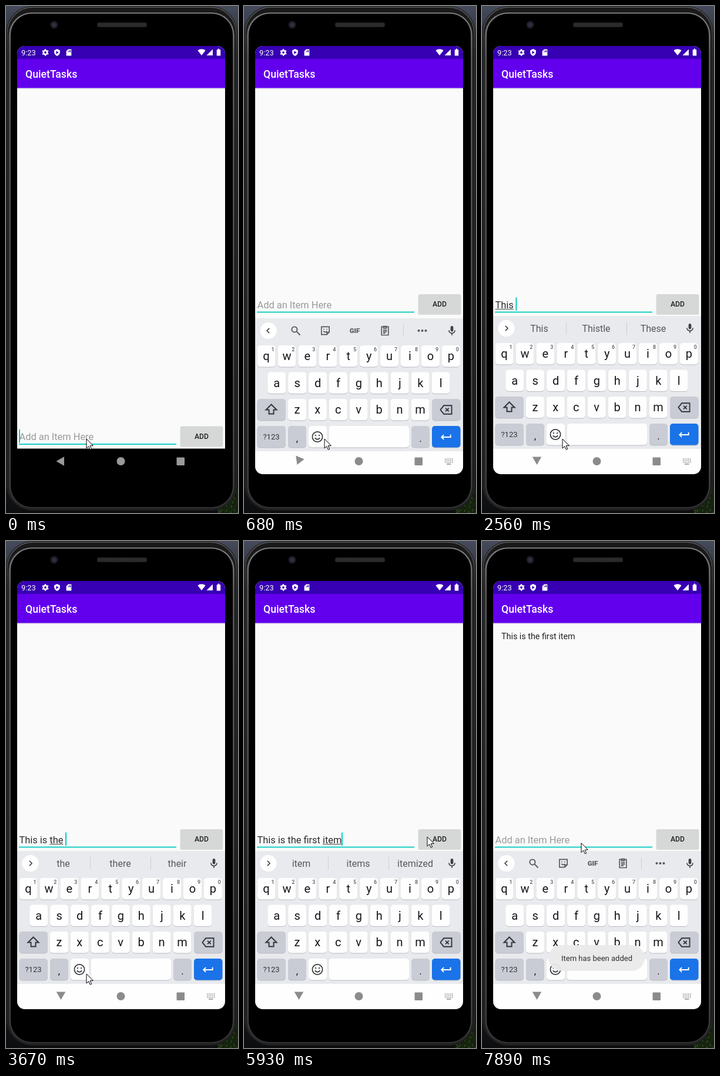
Recreate the animation shown at these times as an HTML page with a canvas. Size 395x862 px, loop 8000 ms.

```html
<!DOCTYPE html>
<html lang="en">
<head>
<meta charset="utf-8">
<title>To-do list demo</title>
<style>
  html, body { margin: 0; width: 100%; height: 100%; overflow: hidden; background: #15161a; }
  canvas { display: block; width: 395px; height: 862px; }
</style>
</head>
<body>
<canvas id="stage"></canvas>
<script>
const W = 395, H = 862, LOOP = 8000, STEP = 133;
const canvas = document.getElementById('stage');
const dpr = window.devicePixelRatio || 1;
canvas.width = W * dpr;
canvas.height = H * dpr;
const c = canvas.getContext('2d');

// [time, field text, suggestions]
const typing = [
  [0, '', ''],
  [1520, 'T', ''],
  [1760, 'Th', 'Th The This'],
  [1900, 'Thi', 'Thi This Think'],
  [2040, 'This', 'This Thistle These'],
  [2320, 'This ', 'This Thistle These'],
  [2580, 'This i', 'i is in'],
  [2710, 'This is', 'is isn\'t it'],
  [2840, 'This is ', 'is isn\'t it'],
  [3110, 'This is t', 't the to'],
  [3380, 'This is th', 'th the that'],
  [3530, 'This is the', 'the there their'],
  [3670, 'This is the ', 'the there their'],
  [3830, 'This is the f', 'f for from'],
  [3950, 'This is the fi', 'fi first find'],
  [4070, 'This is the firs', 'firs first firsts'],
  [4190, 'This is the first', 'first firstly firsthand'],
  [4310, 'This is the first ', 'first firstly firsthand'],
  [4430, 'This is the first i', 'i is in'],
  [4690, 'This is the first ite', 'ite item its'],
  [5000, 'This is the first item', 'item items itemized'],
  [6590, '', '']
];
const caretOff = [[620, 950], [5530, 5930], [6450, 6590], [7090, 7370], [7890, 8000]];

const icons = {
  shield: 'M12 1 3 5v6c0 6 4 10 9 12 5-2 9-6 9-12V5zM9 7l8 5-8 5z',
  card: 'M20 2H10L4 8v14h16zM9 7h2v4H9zM13 5h2v6h-2zM16 5h2v6h-2z',
  wifi: 'M12 22 0 7C7 1 17 1 24 7z',
  signal: 'M1 22h21V1z',
  battery: 'M6 4h4V1h4v3h4v19H6z',
  back: 'M14 7 9 12l5 5',
  next: 'M10 7l5 5-5 5',
  search: 'M15 9.5a5.5 5.5 0 1 1-11 0a5.5 5.5 0 1 1 11 0M14 14l7 7',
  sticker: 'M4 4h16v11l-5 5H4zM20 15h-5v5M8 9h2M14 9h2M8 13q4 4 7 0',
  clip: 'M5 4h14v17H5zM9 3h6v4H9zM8 11h8M8 14h8M8 17h5',
  mic: 'M9 5a3 3 0 0 1 6 0v6a3 3 0 0 1-6 0zM11 17h2v5h-2z',
  micArc: 'M5.5 11a6.5 6.5 0 0 0 13 0',
  shift: 'M12 3 3 12h5v7h8v-7h5z',
  erase: 'M8 4.5h14v15H8l-6-7.5zM11 9l6 6M17 9l-6 6',
  enter: 'M20 8v4.5H4M8 8.5l-4 4 4 4',
  smile: 'M21 12a9 9 0 1 1-18 0a9 9 0 1 1 18 0M7.5 9.5h2.5M14 9.5h2.5M7.5 14q4.5 5 9 0'
};
const paths = Object.fromEntries(Object.entries(icons).map(([k, d]) => [k, new Path2D(d)]));

const clamp = v => Math.min(1, Math.max(0, v));
const lerp = (a, b, p) => a + (b - a) * p;
const ease = p => p * p * (3 - 2 * p);
// Progress that advances in held steps, like the screen capture
const held = (t, from, to) => clamp(Math.floor((t - from) / STEP) * STEP / (to - from));

function rect(x, y, w, h, color, r = 0) {
  c.fillStyle = color;
  c.beginPath();
  c.roundRect(x, y, w, h, r);
  c.fill();
}

function ring(x, y, w, h, r, color, line) {
  c.strokeStyle = color;
  c.lineWidth = line;
  c.beginPath();
  c.roundRect(x, y, w, h, r);
  c.stroke();
}

function disc(x, y, r, color) {
  c.fillStyle = color;
  c.beginPath();
  c.arc(x, y, r, 0, 7);
  c.fill();
}

// Vertical gradient over the whole stage
function fade(...stops) {
  const g = c.createLinearGradient(0, 0, 0, H);
  for (const [at, color] of stops) g.addColorStop(at, color);
  return g;
}

// y is the middle of the capitals; baselines sit on whole pixels
function text(s, x, y, size, color, align = 'left', weight = 400) {
  c.font = `${weight} ${size}px Roboto, sans-serif`;
  c.textAlign = align;
  c.fillStyle = color;
  c.fillText(s, x, Math.round(y + size * 0.355));
}

function icon(name, x, y, size, color, line = 0) {
  c.save();
  c.translate(x, y);
  c.scale(size / 24, size / 24);
  c.translate(-12, -12);
  c.fillStyle = c.strokeStyle = color;
  c.lineWidth = line;
  if (line) c.stroke(paths[name]);
  else c.fill(paths[name], 'evenodd');
  c.restore();
}

function drawPhone() {
  rect(0, 0, W, H, fade([0, '#454b5c'], [0.1, '#25272c'], [0.9, '#1b1c20'], [1, '#0c0d0f']));
  rect(360, 820, 35, 42, '#16240f');
  for (let i = 0, seed = 7; i < 60; i++) {
    seed = seed * 16807 % 2147483647;
    rect(360 + seed % 35, 820 + (seed >> 8) % 42, 1.5, 4, i % 2 ? '#2f4c1b' : '#101a0c');
  }
  rect(0, 0, 394, 858, '#1a1a1b', 46);
  ring(2, 2, 390, 854, 44, fade([0, '#5a5a5c'], [0.1, '#303032'], [1, '#242425']), 1.5);
  rect(4.5, 11, 384.5, 843, fade([0, '#606062'], [0.1, '#454547'], [1, '#303031']), 39);
  rect(8, 13, 378, 839, '#000', 36);
  ring(7, 12, 380.5, 841, 37, fade([0, '#9a9a9c'], [0.1, '#626264'], [0.9, '#4a4a4c'], [1, '#333']), 1.2);
  rect(155, 28, 85, 8, '#262626', 3);
  for (let x = 158; x < 238; x += 3) rect(x, 30, 1.2, 4, '#353535');
  disc(82, 32, 6.5, '#1d1e24');
  disc(82, 32, 3.5, '#2b3044');
}

function drawBars() {
  rect(19, 68, 354, 22, '#3700b3');
  rect(19, 140, 354, 1, '#dcdcde');
  rect(19, 90, 354, 49.6, '#6200ee');
  text('9:23', 26, 79, 12.8, '#fff');
  c.strokeStyle = '#fff';
  c.lineWidth = 2.6;
  c.beginPath();
  c.arc(67, 79, 3.2, 0, 7);
  c.stroke();
  for (let i = 0; i < 6; i++) {
    const a = i * Math.PI / 3 + 0.5;
    disc(67 + 4.7 * Math.cos(a), 79 + 4.7 * Math.sin(a), 1.2, '#fff');
  }
  icon('shield', 87, 79, 13, '#fff');
  icon('card', 107, 79, 13, '#fff');
  icon('wifi', 333, 78.5, 13, '#fff');
  icon('signal', 347, 79, 12, '#fff');
  icon('battery', 362, 78.5, 13, '#fff');
  text('QuietTasks', 33, 116, 17.7, '#fff', 'left', 500);
}

function drawField(t, dy, value, hasSuggestions) {
  const left = 22.5;
  text(value || 'Add an Item Here', left, 508 + dy, 16.4, value ? '#2b2b2b' : '#9a9a9a');
  if (hasSuggestions) {
    const start = value.trimEnd().lastIndexOf(' ') + 1;
    const x = left + c.measureText(value.slice(0, start)).width;
    rect(x, 515 + dy, c.measureText(value.slice(start).trim()).width, 1, '#444');
  }
  if (!caretOff.some(([a, b]) => t >= a && t < b)) {
    rect(value ? left - 0.5 + c.measureText(value).width : 22, 495.5 + dy, 2, 22.5, '#03cfc3');
  }
  rect(22, 519.5 + dy, 268, 2, '#16d0c4');
  rect(296.5, 491 + dy, 73, 34, '#d9d9d9', 2);
  rect(297, 490 + dy, 72, 33, t >= 6450 && t < 6710 ? '#c2c3c3' : '#d6d7d7', 2);
  text('ADD', 333, 507 + dy, 12.2, '#202020', 'center', 500);
}

function key(x, y, w, color = '#fefefe') {
  rect(x, y + 1, w, 36.5, '#b9bcc3', 5);
  rect(x, y, w, 36.5, color, 5);
}

function drawToolbar(words) {
  disc(41.5, 548, 14, '#fff');
  icon(words ? 'next' : 'back', 41.5, 548, 20, '#444', 2);
  icon('mic', 354, 548, 19, '#3f4246');
  icon('micArc', 354, 548, 19, '#3f4246', 2);
  if (words) {
    words.split(' ').forEach((w, i) => text(w, 97.5 + 97 * i, 548.5, 16, '#55585c', 'center'));
    rect(143, 537, 1, 22, '#cdd0d4');
    rect(246, 537, 1, 22, '#cdd0d4');
    return;
  }
  icon('search', 88, 548, 20, '#55585c', 2.3);
  icon('sticker', 138.5, 548, 20, '#55585c', 2);
  text('GIF', 188.5, 548, 11.5, '#55585c', 'center', 900);
  icon('clip', 240, 548, 20, '#55585c', 2);
  rect(271, 538, 1, 20, '#cdd0d4');
  for (const x of [297.5, 303.5, 309.5]) disc(x, 548, 2, '#55585c');
}

function drawKeyboard(offset, upper, words) {
  const pitch = 34.93, gray = '#c9ccd4', ink = '#15161a';
  c.save();
  c.translate(0, offset);
  rect(19, 527, 354, 226, '#e8eaed');
  rect(19, 753, 354, 60, '#fefefe');
  drawToolbar(words);
  [['qwertyuiop', 38, 573], ['asdfghjkl', 55.7, 618.5], ['zxcvbnm', 90.4, 664]].forEach(([row, x0, y], r) =>
    [...row].forEach((ch, i) => {
      const x = x0 + pitch * i;
      key(x - 15.5, y, 31);
      text(upper ? ch.toUpperCase() : ch, x, y + 18.2, 20, ink, 'center');
      if (!r) text((i + 1) % 10, x + 11, y + 6.8, 9, '#55585c', 'center', 500);
    }));
  key(22.5, 664, 48.5, gray);
  icon('shift', 46.5, 682.5, 24, '#33363b', upper ? 0 : 2);
  key(320, 664, 48.5, gray);
  icon('erase', 344, 682.5, 23, '#33363b', 2);
  key(22.5, 710, 48.5, gray);
  text('?123', 46.5, 728.5, 13, '#33363b', 'center');
  key(75, 710, 31, gray);
  text(',', 90.5, 730.5, 17, ink, 'center');
  key(110, 710, 31);
  icon('smile', 125, 728.5, 23, '#33363b', 1.8);
  key(144.5, 710, 136.5);
  key(285, 710, 31, gray);
  text('.', 300.5, 730.5, 17, ink, 'center');
  key(320, 710, 48.5, '#1a73e8');
  icon('enter', 344, 728.5, 23, '#fff', 2);
  c.restore();
}

function drawNav(turn, keyboardShown) {
  const gray = keyboardShown ? '#8b8b8b' : '#999';
  c.save();
  c.translate(lerp(94, 93.5, turn), lerp(774, 771.5, turn));
  c.rotate(Math.PI * (1 - turn / 2));
  c.fillStyle = gray;
  c.beginPath();
  c.moveTo(8.5, 0);
  c.lineTo(-5, 7.8);
  c.lineTo(-5, -7.8);
  c.fill();
  c.restore();
  disc(195.5, 774, 7, gray);
  rect(290.5, 767.5, 13.5, 13.5, gray, 1);
  if (keyboardShown) {
    for (let i = 0; i < 15; i++) rect(342 + i % 5 * 3, 769.5 + Math.floor(i / 5) * 2.8, 1.6, 1.5, gray);
    rect(345, 778, 7.5, 1.5, gray);
  }
}

function drawToast(t) {
  c.globalAlpha = 0.95 * clamp((t - 6580) / 160);
  rect(113, 687, 164, 44, '#eaeaeb', 22);
  text('Item has been added', 195.5, 709.5, 13, '#252525', 'center');
  c.globalAlpha = 1;
}

function drawPointer(t) {
  const go = ease(held(t, 5397, 5929));
  let x = lerp(137, 312, go), y = lerp(736, 503, go);
  if (t >= 6070) {
    const back = ease(held(t, 6838, 7370));
    x = lerp(328.5, 169, back);
    y = lerp(511, 513.5, back);
  }
  c.save();
  c.translate(x, y);
  c.beginPath();
  for (const [px, py] of [[0, 0], [0, 16], [3.7, 12.5], [6.3, 18.3], [8.7, 17.2], [6.2, 11.7], [11.3, 11.4]]) c.lineTo(px, py);
  c.closePath();
  c.fillStyle = '#fff';
  c.strokeStyle = '#000';
  c.lineWidth = 1;
  c.fill();
  c.stroke();
  c.restore();
}

function draw(t) {
  const shown = t >= 413;
  const slideTime = Math.floor((t - 14) / STEP) * STEP + 14;
  const slide = clamp((slideTime - 400) / 370);
  const [, value, words] = typing.findLast(([start]) => t >= start);
  c.setTransform(dpr, 0, 0, dpr, 0, 0);
  drawPhone();
  c.save();
  c.beginPath();
  c.roundRect(19, 68, 354, 728, 13);
  c.clip();
  rect(19, 68, 354, 684.5, '#fafafa');
  drawBars();
  if (t >= 6590) text('This is the first item', 33, 162, 14.3, '#222');
  drawField(t, shown ? 0 : 224.5, value, words);
  if (shown) drawKeyboard(269 * (1 - slide) ** 3, t >= 1390 && t < 1760, words);
  drawNav(slide, slide > 0.3);
  if (t >= 6580) drawToast(t);
  c.restore();
  drawPointer(t);
}

const begin = performance.now();
function tick() {
  draw((performance.now() - begin) % LOOP);
  requestAnimationFrame(tick);
}
tick();
</script>
</body>
</html>
```
